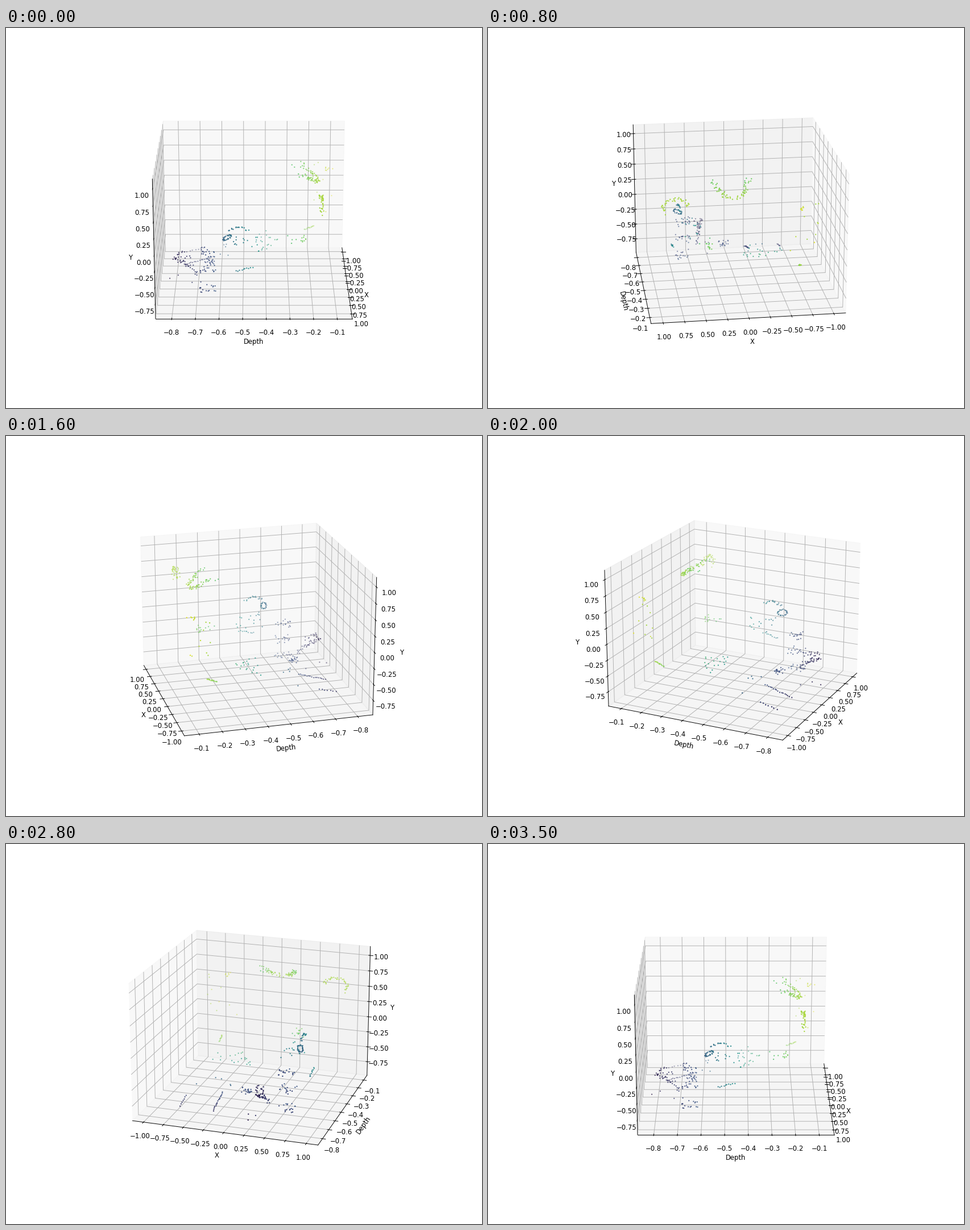
Animation of 837x669 px, one loop 3600 ms. Source, as a matplotlib script:

```python
import numpy as np
import matplotlib.pyplot as plt
from matplotlib.animation import FuncAnimation
from matplotlib.colors import LinearSegmentedColormap

FRAMES = 36
DPI = 83.7
WIDTH, HEIGHT = 837, 669
LIMITS = np.array([(-1.14, 1.14), (-0.8686, -0.0363), (-0.98, 1.144)])
BOX = np.array([1.1905, 1.1905, 0.8929])  # size of the drawn box in view units

rng = np.random.default_rng(7)


def curve(n, fn, t0=0, t1=1, spread=0.004):
    """Sample fn(t) -> x, depth, height and scatter the samples."""
    t = np.linspace(t0, t1, n)
    pts = np.column_stack(np.broadcast_arrays(*fn(t)))
    return pts + rng.uniform(-1, 1, pts.shape) * spread


def cloud(n, x, d, h, spread):
    return np.array([x, d, h]) + rng.uniform(-1, 1, (n, 3)) * spread


def ground(d):
    return -0.25 + 0.29 * d


def ring(t):
    u, v = np.cos(t), np.sin(t)
    return (0.353 + 0.022 * u + 0.006 * v,
            -0.163 - 0.023 * u + 0.0065 * v,
            -0.013 + 0.018 * v)


def brow(t):
    return 0.355, -0.156 + 0.118 * t, 0.034 + 0.016 * np.sin(np.pi * t)


def smile(t):
    # sparse in the middle, frayed towards smaller depth at both tips
    s = np.sign(t) * np.abs(t) ** 0.6
    fray = 0.1 * s ** 6 * rng.random(t.size) ** 2
    return 0.07 + 0.11 * s, 0.40 - 0.09 * s ** 2 - fray, 0.257 + 0.075 * s ** 2


def hook(t):
    return 0.42 + 0.075 * np.cos(t), 0.405 + 0 * t, 0.22 + 0.055 * np.sin(t)


def body(t):
    return 0.18 + 0.025 * t, -0.50 + 0.145 * t, -0.22 - 0.04 * t - 0.06 * t ** 4


parts = [
    curve(28, ring, 0, 2 * np.pi, 0.004),
    curve(16, brow, spread=0.008),
    curve(64, smile, -1, 1, (0.016, 0.012, 0.012)),
    curve(36, hook, np.pi, -0.6, 0.013),
    curve(34, body, spread=0.013),
    # short rows
    curve(10, lambda t: (0.40, -0.108 + 0.1 * t, -0.215 + 0.025 * t)),
    curve(12, lambda t: (-0.35, 0.335 + 0.06 * t, -0.222 + 0.027 * t)),
    # loose groups
    cloud(20, 0.045, -0.28, -0.286, (0.035, 0.03, 0.018)),
    cloud(14, 0.19, -0.43, -0.195, (0.03, 0.06, 0.02)),
    cloud(16, 0.27, -0.05, -0.09, (0.07, 0.08, 0.05)),
    cloud(13, 0.22, 0.28, -0.075, (0.04, 0.08, 0.025)),
    cloud(11, -0.35, 0.45, 0.06, (0.1, 0.06, 0.16)),
    cloud(6, -0.336, 0.473, 0.199, 0.012),
]

# stacked layers in front
for h in np.linspace(-0.36, -0.13, 3):
    parts.append(cloud(17, 0.31, -0.285, h, (0.05, 0.05, 0.02)))

# dashes running along the ground
for x, d, n in ((-0.12, -0.262, 17), (-0.34, -0.33, 7)):
    parts.append(curve(n, lambda t: (x, d - (0.44 + d) * t,
                                     ground(d - (0.44 + d) * t)), spread=0.003))

# dots lying on the ground
for n, x, d in ((20, -0.163, 0.085), (5, -0.21, -0.15), (3, 0.13, -0.46)):
    parts.append(cloud(n, x, d, ground(d), (0.13 if n > 3 else 0.01, 0.08, 0.03)))

points = np.vstack(parts) / BOX * np.ptp(LIMITS, axis=1) + LIMITS.mean(axis=1)
x, depth, y = points.T

cmap = LinearSegmentedColormap.from_list(
    "depth", ["#2a1846", "#3b4f80", "#21918c", "#5ec962", "#f5e61f"])

fig = plt.figure(figsize=(WIDTH / DPI, (HEIGHT + 1e-6) / DPI), dpi=DPI)
# default margins of a 10 x 8 inch layout
fit = 8 * DPI / HEIGHT
fig.subplots_adjust(bottom=0.11 * fit, top=0.88 * fit)
ax = fig.add_subplot(projection="3d")
ax.scatter(x, depth, y, c=depth, cmap=cmap, s=1, vmin=-0.83, vmax=-0.07)
ax.set(xlim=LIMITS[0], ylim=LIMITS[1], zlim=LIMITS[2],
       xlabel="X", ylabel="Depth", zlabel="Y")


def update(i):
    # one full turn; the last pose repeats the first
    ax.view_init(elev=20, azim=360 * (i % (FRAMES - 1)) / (FRAMES - 1))
    return ()


anim = FuncAnimation(fig, update, frames=FRAMES, init_func=lambda: update(0),
                     interval=100, repeat=True, repeat_delay=0)
plt.show()
```
